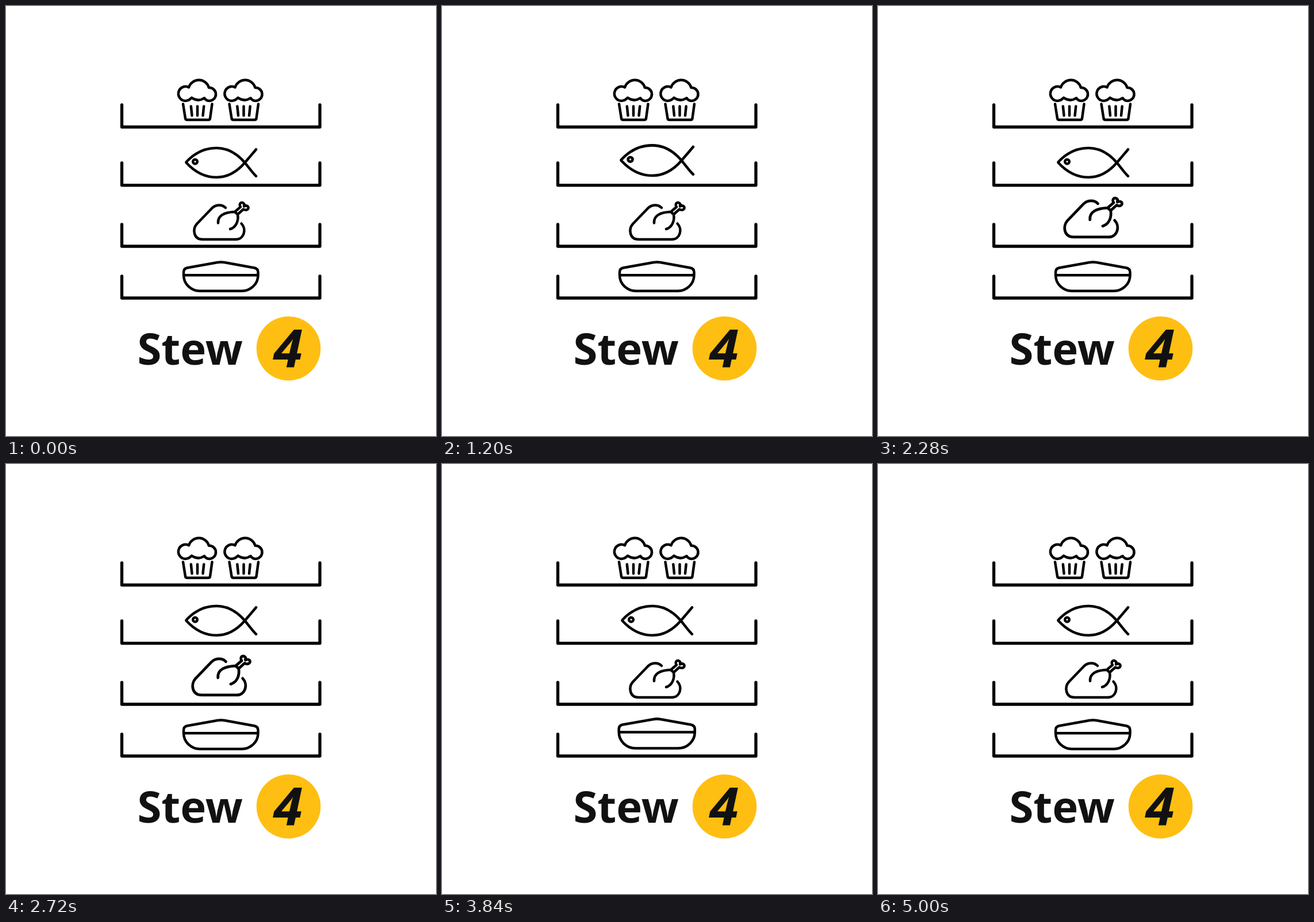
An HTML page for the animation above (5480 ms loop, 748 px wide and 748 px high).

```html
<!DOCTYPE html>
<html lang="en">
<head>
<meta charset="utf-8">
<style>
  html, body { margin: 0; height: 100%; overflow: hidden; background: #fff; }
  svg { display: block; width: 100%; height: 100%; }
  .line { fill: none; stroke: #000; stroke-width: 4.5; stroke-linecap: round; stroke-linejoin: round; }
  .shelf { stroke-width: 5.3; }
  text { font-family: "Open Sans", "Noto Sans", sans-serif; font-weight: 700; fill: #111; }
</style>
</head>
<body>
<svg viewBox="0 0 748 748">
  <g class="line shelf">
    <path d="M201.5 172V210.5H546V172"/>
    <path d="M201.5 273V311.8H546V273"/>
    <path d="M201.5 380V418H546V380"/>
    <path d="M201.5 470V508H546V470"/>
  </g>

  <g class="line" id="muffins">
    <g id="muffin">
      <path d="M318 141.5A12.45 12.45 0 1 0 311.5 165Q318 165 323 159.5Q334 167.5 345 160Q348 165 354 165A11.5 11.5 0 1 0 353 142A18.3 18.3 0 0 0 318 141.5Z"/>
      <path d="M308 170.5L312 195.5Q312.5 198 315 198H352Q354.5 198 355 195.5L358.5 170.5"/>
      <path d="M321.8 174.5L323.5 190.5M333 174.5V190.5M344.2 174.5L342.5 190.5"/>
    </g>
    <use href="#muffin" x="80.5"/>
  </g>

  <g class="line" id="fish">
    <path d="M435 296C427 288 421 279 415 272C402 257 385 247 366 247C345 247 327 257 314 271Q313 272 314 273C327 287 345 298 366 298C385 298 402 288 415 273C421 266 428 258 435 249.5"/>
    <circle cx="329" cy="270.8" r="3.8"/>
  </g>

  <g class="line" id="chicken">
    <path d="M382 351C376 345 366 345 359 351L332 379C324 388 326 406 342 406H400C414 406 419 388 409.5 378.5"/>
    <path d="M369 377.5C368 364 380 359 398 358L408 349.5C404 344 410 338.5 414.5 344.5L414 348.5C421 345 424.5 352 419 354.5Q415 355.5 413 353.5L403 362.5C405 374 400 385 390 388M398 358L403 362.5"/>
  </g>

  <g class="line" id="pie">
    <path d="M309 468.2V463Q309 457 315 455.5L368 446Q374 445 380 446L432 455.5Q438.5 457 438.5 463V468.2A28.5 27.5 0 0 1 410 495.7H337.5A28.5 27.5 0 0 1 309 468.2H438.5"/>
  </g>

  <text x="228.5" y="624" font-size="76">Stew</text>
  <g id="badge">
    <circle cx="491.5" cy="595.7" r="55.8" fill="#ffbe12"/>
    <text x="490.5" y="629" font-size="92" font-style="italic" text-anchor="middle">4</text>
  </g>
</svg>
<script>
  const LOOP = 5480, STEP = 40, BEAT = 1000;

  // Each part pulses in turn: centre, extra scale and lift at the peak.
  const parts = [
    { id: "muffins", cx: 373, cy: 163.5, grow: 0.09, lift: 7 },
    { id: "fish", cx: 374, cy: 272.5, grow: 0.09, lift: 11 },
    { id: "chicken", cx: 374, cy: 374, grow: 0.1, lift: 10 },
    { id: "pie", cx: 373.8, cy: 470.5, grow: 0.085, lift: 7 },
    { id: "badge", cx: 491.5, cy: 595.7, grow: 0.12, lift: 0 }
  ];
  for (const part of parts) part.node = document.getElementById(part.id);

  const start = performance.now();

  function draw(now) {
    const elapsed = Math.max(0, now - start) % LOOP;
    const time = Math.floor(elapsed / STEP) * STEP;
    parts.forEach(({ node, cx, cy, grow, lift }, i) => {
      const phase = Math.min(1, Math.max(0, time / BEAT - i));
      const pulse = (1 - Math.cos(2 * Math.PI * phase)) / 2;
      node.setAttribute("transform",
        `translate(${cx} ${cy - lift * pulse}) scale(${1 + grow * pulse}) translate(${-cx} ${-cy})`);
    });
    requestAnimationFrame(draw);
  }
  draw(start);
</script>
</body>
</html>
```
